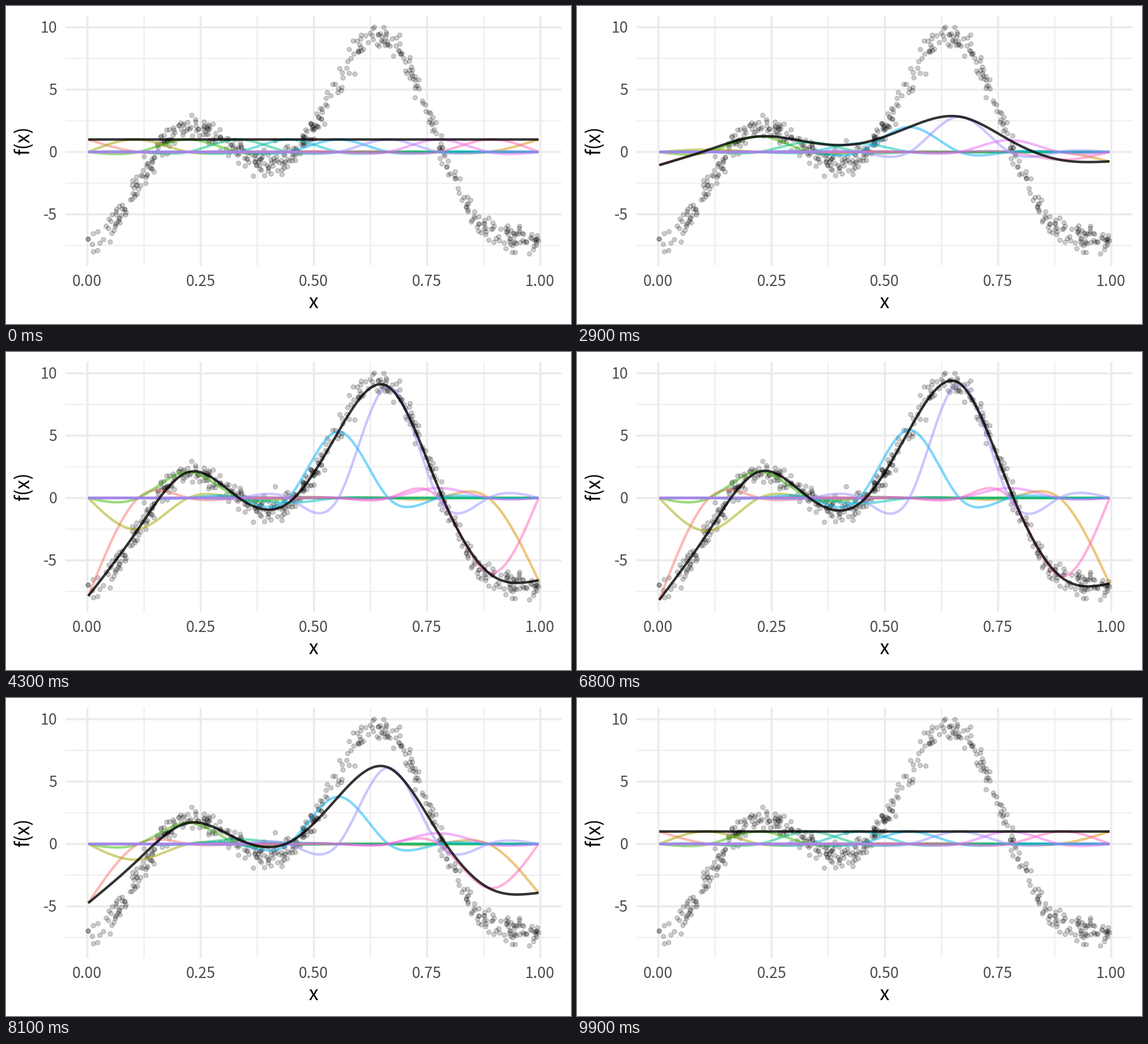
A matplotlib script that plays this animation: 998x561 px, repeating every 10 s.

```python
import math

import numpy as np
import matplotlib.pyplot as plt
from matplotlib.animation import FuncAnimation

W, H, DPI = 998, 561, 128
PT = 72 / DPI  # points per pixel
FRAMES = 100
N_POINTS, N_BASIS = 500, 10
FONT = "Noto Sans CJK JP"

HUES = ["#F8766D", "#A3A500", "#39B600", "#00BF7D", "#00BFC4",
        "#00B0F6", "#9590FF", "#E76BF3", "#FF62BC", "#D89000"]
STACK = [0, 9, 1, 2, 4, 3, 5, 8, 7, 6]  # basis functions, bottom to top


def px(x):
    return 143.8 + 800 * np.asarray(x)


def py(y):
    return 257.5 - 22 * np.asarray(y)


def seeded_uniform(seed, count):
    """Mersenne Twister uniforms, state filled by a linear congruential rule."""
    key = []
    for _ in range(50 + 1 + 624):
        seed = (69069 * seed + 1) % 2**32
        key.append(seed)
    rng = np.random.RandomState()
    rng.set_state(("MT19937", np.array(key[-624:], dtype=np.uint32), 624))
    return rng.randint(0, 2**32, size=count, dtype=np.uint32) / 2**32


def normal_from_uniform(u):
    """Normal deviates by inversion, two uniforms for each."""
    big = 2**27
    p = (np.floor(big * u[0::2]) + u[1::2]) / big
    z = np.linspace(-6, 6, 6001)
    cdf = [0.5 * math.erfc(-v / math.sqrt(2)) for v in z]
    return np.interp(p, cdf, z)


def true_curve(x):
    return x**11 * (10 * (1 - x))**6 + 10 * (10 * x)**3 * (1 - x)**10


def spline_basis(x, knots):
    """Cardinal natural cubic splines: column i is 1 at knot i, 0 at the others."""
    n = len(knots)
    h = np.diff(knots)
    d = np.zeros((n - 2, n))
    b = np.zeros((n - 2, n - 2))
    for i in range(n - 2):
        d[i, i:i + 3] = 1 / h[i], -1 / h[i] - 1 / h[i + 1], 1 / h[i + 1]
        b[i, i] = (h[i] + h[i + 1]) / 3
        if i < n - 3:
            b[i, i + 1] = b[i + 1, i] = h[i + 1] / 6
    curv = np.zeros((n, n))
    curv[1:-1] = np.linalg.solve(b, d)

    j = np.clip(np.searchsorted(knots, x, side="right") - 1, 0, n - 2)
    left, right, step = x - knots[j], knots[j + 1] - x, h[j]
    eye = np.eye(n)

    def col(v):
        return v[:, None]

    return (col(right / step) * eye[j] + col(left / step) * eye[j + 1]
            + col((right**3 / step - step * right) / 6) * curv[j]
            + col((left**3 / step - step * left) / 6) * curv[j + 1])


def ease(u):
    u = min(max(u, 0), 1)
    return 4 * u**3 if u < 0.5 else 1 - 4 * (1 - u)**3


# Noisy sample and its least-squares spline fit on evenly spaced knots
u = seeded_uniform(1, 3 * N_POINTS)
xs = u[:N_POINTS]
ys = true_curve(xs) + 0.5 * normal_from_uniform(u[N_POINTS:])
ys -= ys.mean()
knots = np.linspace(xs.min(), xs.max(), N_BASIS)
fitted = np.linalg.lstsq(spline_basis(xs, knots), ys, rcond=None)[0]
grid = np.linspace(xs.min(), xs.max(), 300)
basis = spline_basis(grid, knots)

fig = plt.figure(figsize=(W / DPI, H / DPI), dpi=DPI, facecolor="white")
ax = fig.add_axes([0, 0, 1, 1])
ax.set_xlim(0, W)
ax.set_ylim(H, 0)
ax.axis("off")


def rule(x, y, width):
    ax.plot(x, y, color="#EBEBEB", lw=width * PT, solid_capstyle="butt",
            snap=False, zorder=1)


def label(x, y, text, size, color, **kw):
    ax.text(x, y, text, fontsize=size * PT, color=color, family=FONT,
            va="baseline", **kw)


# Panel grid: minor lines first, then major
LEFT, RIGHT, TOP, BOTTOM = 105, 981, 17, 458
for xv in (0.125, 0.375, 0.625, 0.875):
    rule([px(xv)] * 2, [TOP, BOTTOM], 1.8)
for yv in (-7.5, -2.5, 2.5, 7.5):
    rule([LEFT, RIGHT], [py(yv)] * 2, 1.8)
for xv in (0, 0.25, 0.5, 0.75, 1):
    rule([px(xv)] * 2, [TOP, BOTTOM], 3.6)
    label(px(xv) - 0.5, 493.5, f"{xv:.2f}", 26.9, "#4D4D4D", ha="center")
for yv in (-5, 0, 5, 10):
    rule([LEFT, RIGHT], [py(yv)] * 2, 3.6)
    label(90.5, py(yv) + 9, str(yv), 26.9, "#4D4D4D", ha="right")
label(543, 533, "x", 34, "black", ha="center")
label(41.5, 237, "f(x)", 34, "black", ha="center", rotation=90,
      rotation_mode="anchor")

# One size per point keeps the markers off the whole-pixel raster
ax.scatter(px(xs), py(ys), s=np.full(N_POINTS, (8 * PT)**2),
           facecolor=(0, 0, 0, 0.2), edgecolor=(0, 0, 0, 0.2),
           linewidth=1.3 * PT, zorder=2)


def curve(color, alpha, z):
    return ax.plot([], [], color=color, alpha=alpha, lw=4.4 * PT, snap=False,
                   solid_capstyle="butt", solid_joinstyle="round", zorder=z)[0]


curves = {i: curve(HUES[i], 0.5, 3) for i in STACK}
total = curve("black", 0.8, 4)


def draw(frame):
    if frame < 60:
        mix = ease((frame - 16) / 34)
    else:
        mix = 1 - ease((frame - 66) / 33)
    weights = 1 + mix * (fitted - 1)
    for i, line in curves.items():
        line.set_data(px(grid), py(weights[i] * basis[:, i]))
    total.set_data(px(grid), py(basis @ weights))
    return [*curves.values(), total]


anim = FuncAnimation(fig, draw, frames=FRAMES, interval=100, repeat=True,
                     repeat_delay=0, blit=False)
plt.show()
```
